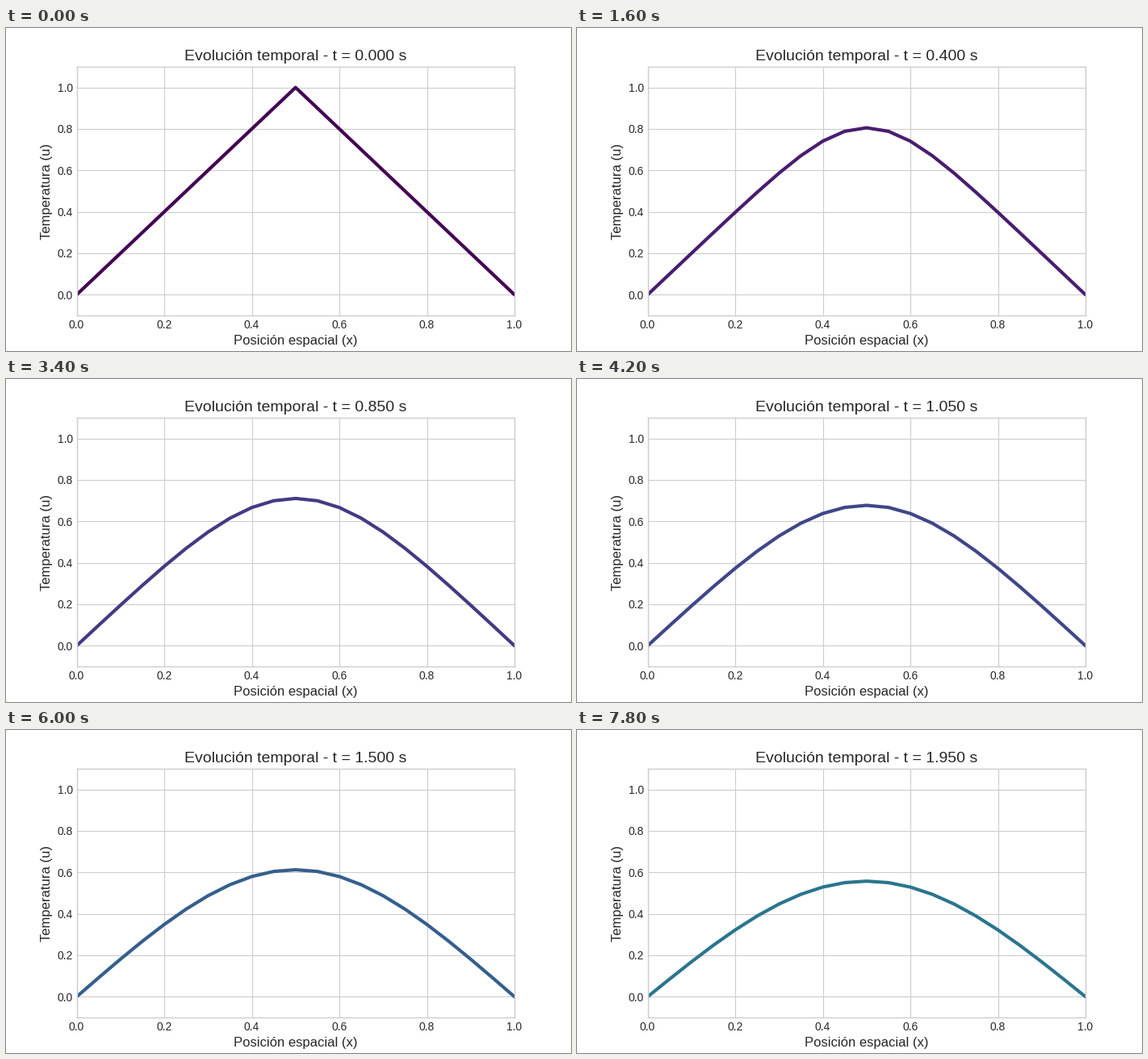
Write a matplotlib script that moves like this. It is 700 by 400 pixels and loops after 8 s.

```python
import numpy as np
import matplotlib.pyplot as plt
from matplotlib.animation import FuncAnimation

plt.style.use("seaborn-v0_8-whitegrid")
plt.rcParams["font.family"] = "Liberation Sans"

ALPHA, DX, DT = 0.02, 0.05, 0.05
FRAMES, TOTAL_STEPS = 40, 100

x = np.linspace(0, 1, 21)


def solve_heat(steps):
    """Implicit Euler for u_t = alpha * u_xx with both ends held at zero."""
    n = len(x)
    r = ALPHA * DT / DX**2
    a = (1 + 2 * r) * np.eye(n) - r * (np.eye(n, k=1) + np.eye(n, k=-1))
    a[0], a[-1] = np.eye(n)[0], np.eye(n)[-1]
    states = [1 - np.abs(2 * x - 1)]
    for _ in range(steps - 1):
        states.append(np.linalg.solve(a, states[-1]))
    return states


states = solve_heat(FRAMES)

fig, ax = plt.subplots(figsize=(7, 4), dpi=100)
ax.set_xlim(0, 1)
ax.set_ylim(-0.1, 1.1)
ax.set_xlabel("Posición espacial (x)", fontsize=12)
ax.set_ylabel("Temperatura (u)", fontsize=12)
title = ax.set_title("", fontsize=14)
line, = ax.plot(x, states[0], lw=3)


def update(k):
    line.set_ydata(states[k])
    line.set_color(plt.cm.viridis(k / TOTAL_STEPS))
    title.set_text(f"Evolución temporal - t = {k * DT:.3f} s")
    return line, title


anim = FuncAnimation(fig, update, frames=FRAMES, init_func=lambda: update(0),
                     interval=200, repeat=True, repeat_delay=0)
plt.show()
```
